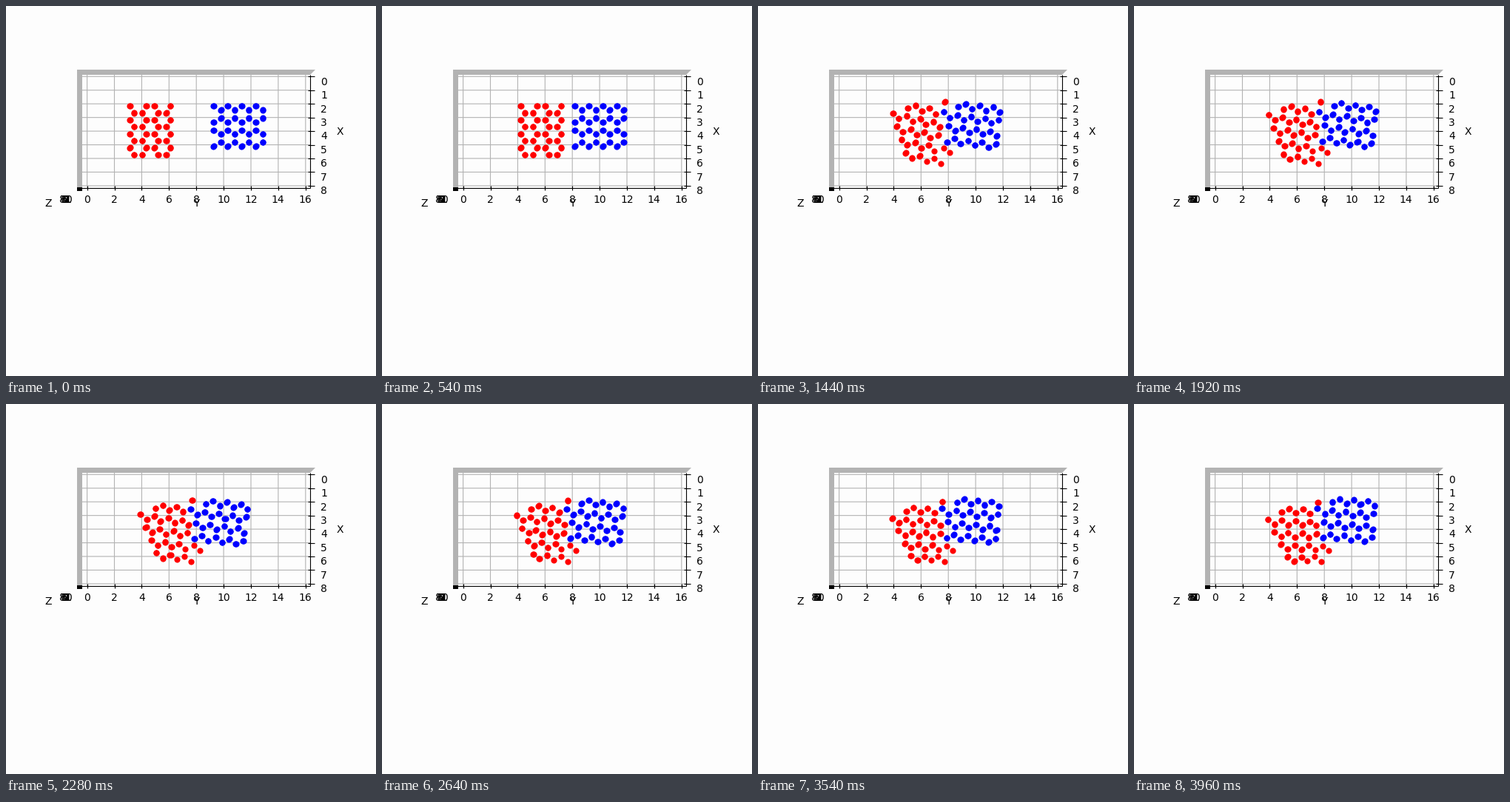
Recreate the animation shown at these times as a matplotlib script. Size 500 px wide and 500 px high, loop 4.02 s.

```python
import numpy as np
import matplotlib.pyplot as plt
from matplotlib.animation import FuncAnimation

SIZE, FRAMES, STEP_MS = 500, 67, 60
PAPER, GRID = "#fdfdfd", "#b3b3b3"
UNIT = 18.45          # pixels per data unit
BOND_STEP, CHAIN_STEP, ZIG = 9.44, 16.3, 2.7
IMPACT, SPEED = 11, 2.24
plt.rcParams["font.family"] = "DejaVu Sans"


def settle(s, tau):
    return 1 - np.exp(-s / tau)


def red_pose(s):
    """Centre x, centre y and tilt, s steps after the impact."""
    x = 213.2 - 5.9 * np.exp(-s / 17) + 3.9 * np.exp(-s / 2)
    return x, 168 + 0.16 * s, 17 * settle(s, 5.5) + 0.2 * s


def blue_pose(s):
    x = 290 + 2.7 * np.exp(-s / 17) - 3.5 * np.exp(-s / 2)
    return x, 162.3 - 0.11 * s, 0.11 * s - 10.5 * settle(s, 8)


# Atoms torn loose at the impact: (layer, chain, site) -> final displacement
RED_LOOSE = {
    (0, 3, 0): (19.5, 2), (1, 3, 0): (19.5, 2),
    (0, 3, 6): (8, 17), (1, 3, 6): (-0.5, 11),
    (0, 3, 7): (-2, 21), (1, 3, 7): (-11.5, 14.5),
    (1, 2, 7): (-11.5, 15),
}
BLUE_LOOSE = {(0, 0, 0): (-11.5, 14), (1, 0, 0): (-11.5, 14.5)}


def honeycomb(mid, upright):
    """Four zigzag chains of eight sites, relative to chain index mid."""
    k, i = np.mgrid[0:4, 0:8]
    along = BOND_STEP * (i - 3.5)
    across = CHAIN_STEP * (k - mid) - ZIG * (-1.0) ** (i + k)
    pair = (across, along) if upright else (along, across)
    return np.stack(pair, axis=-1)


class Crystal:
    def __init__(self, ax, color, sites, pose, heading, flare, loose, seed):
        self.sites, self.pose, self.heading = sites, pose, heading
        self.flare = np.array(flare)
        self.torn = np.zeros((2, 4, 8, 2))
        for key, shift in loose.items():
            self.torn[key] = shift
        rng = np.random.default_rng(seed)
        self.phase = rng.uniform(0, 2 * np.pi, self.torn.shape)
        self.rate = rng.uniform(0.4, 0.9, self.torn.shape)
        self.dots = ax.scatter([], [], s=20, c=color, linewidths=1.4, zorder=5)

    def place(self, t):
        s = max(t - IMPACT, 0)
        x, y, tilt = self.pose(s)
        x += self.heading * SPEED * min(t - IMPACT, 0)
        a = np.radians(tilt)
        turn = np.array([[np.cos(a), -np.sin(a)], [np.sin(a), np.cos(a)]])
        centre = self.sites @ turn + (x, y)

        # The two layers slip apart for a moment after the impact
        half = (np.array([0.7, -0.4]) + self.flare * np.exp(-((t - 16) / 3) ** 2)) / 2
        heat = 0.3 * min(s / 4, 1) * np.sin(self.rate * t + self.phase)
        pos = np.stack([centre - half, centre + half]) + heat + self.torn * settle(s, 4)
        self.dots.set_offsets(pos.reshape(-1, 2))
        return self.dots


def draw_box(ax):
    def line(x, y, color="black", z=3, snap=None):
        ax.plot(x, y, color=color, lw=0.8, zorder=z, snap=snap, solid_capstyle="butt")

    def grid(x, y):
        line(x, y, GRID, 2, False)

    def fill(x, y, color):
        ax.fill(x, y, color=color, lw=0, zorder=1)

    def label(x, y, s):
        ax.text(x, y, s, fontsize=10, ha="center", va="center_baseline", zorder=6)

    left, right, top, bottom = 103, 411, 93, 246
    fill([96, 418, right, 96], [86, 86, top, top], GRID)
    fill([96, left, left, 96], [86, 86, bottom, bottom], GRID)
    fill([96, left, left, 96], [245, 245, 250, 250], "black")

    for v in range(0, 17, 2):
        x = 257.2 + UNIT * (v - 8)
        grid([x, x], [top, bottom])
        line([x, x], [243, 249])
        label(257.2 + 18.4 * (v - 8), 261, str(v))
    for v in range(9):
        y = 95.3 + UNIT * v
        grid([left, right], [y, y])
        line([408, 417], [y, y])
        label(429.7, y + 5.8, str(v))
        label(84.5 - v, 261, str(v))

    line([99, right], [bottom, bottom])
    line([right, right], [top, bottom])
    label(451.5, 168.5, "X")
    label(257, 265.5, "Y")
    label(57.5, 265.5, "Z")


fig = plt.figure(figsize=(SIZE / 100, SIZE / 100), dpi=100, facecolor=PAPER)
ax = fig.add_axes([0, 0, 1, 1])
ax.axis("off")
draw_box(ax)
crystals = [
    Crystal(ax, "red", honeycomb(1, True), red_pose, 1, (2.2, 1.5), RED_LOOSE, 1),
    Crystal(ax, "blue", honeycomb(1.5, False), blue_pose, -1, (1.8, -0.2), BLUE_LOOSE, 2),
]
ax.set_xlim(0, SIZE)
ax.set_ylim(SIZE, 0)


def update(n):
    return [c.place(n) for c in crystals]


anim = FuncAnimation(fig, update, frames=FRAMES, interval=STEP_MS,
                     repeat=True, repeat_delay=0, blit=False)
plt.show()
```
